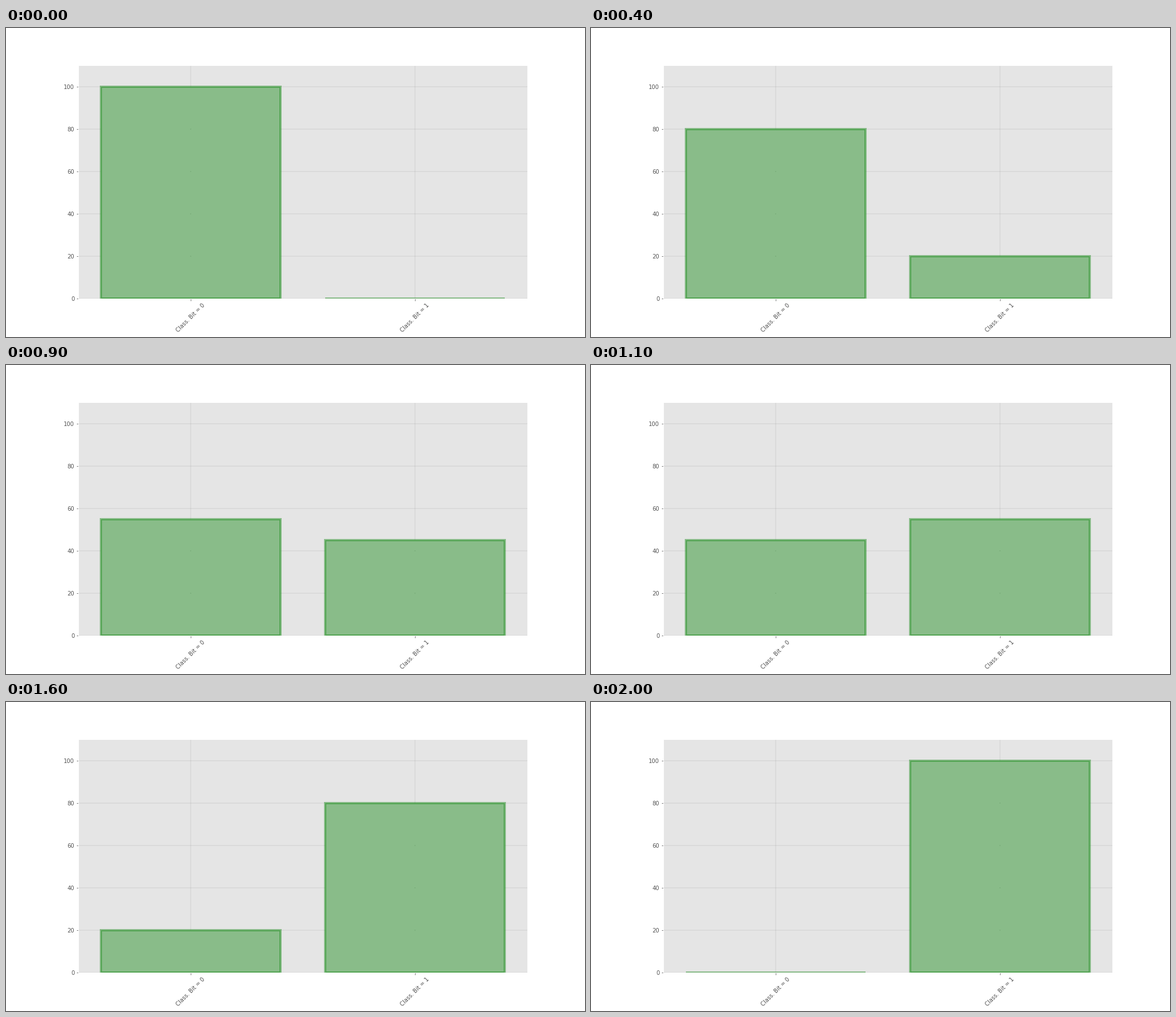
These frames come from a looping animation (1025x547 px, 2.1 s). A matplotlib script:

```python
import matplotlib.pyplot as plt
from matplotlib.animation import FuncAnimation

W, H, DPI = 1025, 547, 72
FRAMES, INTERVAL = 21, 100
STEP = 100 / (FRAMES - 1)
GREEN, PANEL, INK = "#008000", "#E5E5E5", "#555555"
LEVELS = range(20, 100, 20)

plt.rcParams["font.family"] = "DejaVu Sans"
plt.rcParams["font.size"] = 10

fig = plt.figure(figsize=(W / DPI, H / DPI), dpi=DPI, facecolor="white")


def px_rect(left, top, right, bottom):
    return [left / W, 1 - bottom / H, (right - left) / W, (bottom - top) / H]


ax = fig.add_axes(px_rect(128.16, 66.35, 922.75, 478.85), facecolor=PANEL)
ax.set_xlim(-0.5, 1.5)
ax.set_ylim(0, 110)
ax.set_axisbelow(True)
ax.grid(color="gray", alpha=0.1, linewidth=2, linestyle="-")
ax.set_xticks([0, 1], ["Class. Bit = 0", "Class. Bit = 1"], rotation=45)
ax.set_yticks(range(0, 101, 20))
ax.tick_params(length=3.5, width=0.8, pad=3.5, color=INK, labelcolor=INK)
for spine in ax.spines.values():
    spine.set(color="white", linewidth=1)

# Opaque backing hides the grid under the translucent bars.
backs = ax.bar([0, 1], [0, 0], 0.8, color=PANEL, linewidth=0, zorder=0.8)
bars = ax.bar([0, 1], [0, 0], 0.8, color=GREEN, edgecolor=GREEN,
              linewidth=4, alpha=0.4, zorder=1)

# Grid crossings stay faintly visible through the bars.
dots, = ax.plot([], [], "s", color="#D2D2D2", markersize=2,
                markeredgewidth=0, zorder=0.9)
ax.set_xlim(-0.5, 1.5)
ax.set_ylim(0, 110)


def draw(frame):
    ones = STEP * frame
    heights = (100 - ones, ones)
    for back, bar, height in zip(backs, bars, heights):
        back.set_height(height)
        bar.set_height(height)
    marks = [(x, y) for x in (0, 1) for y in LEVELS if y < heights[x]]
    dots.set_data([x for x, _ in marks], [y for _, y in marks])
    return [*backs, *bars, dots]


anim = FuncAnimation(fig, draw, frames=FRAMES, interval=INTERVAL,
                     init_func=lambda: draw(0), repeat=True, repeat_delay=0,
                     blit=False)
plt.show()
```
